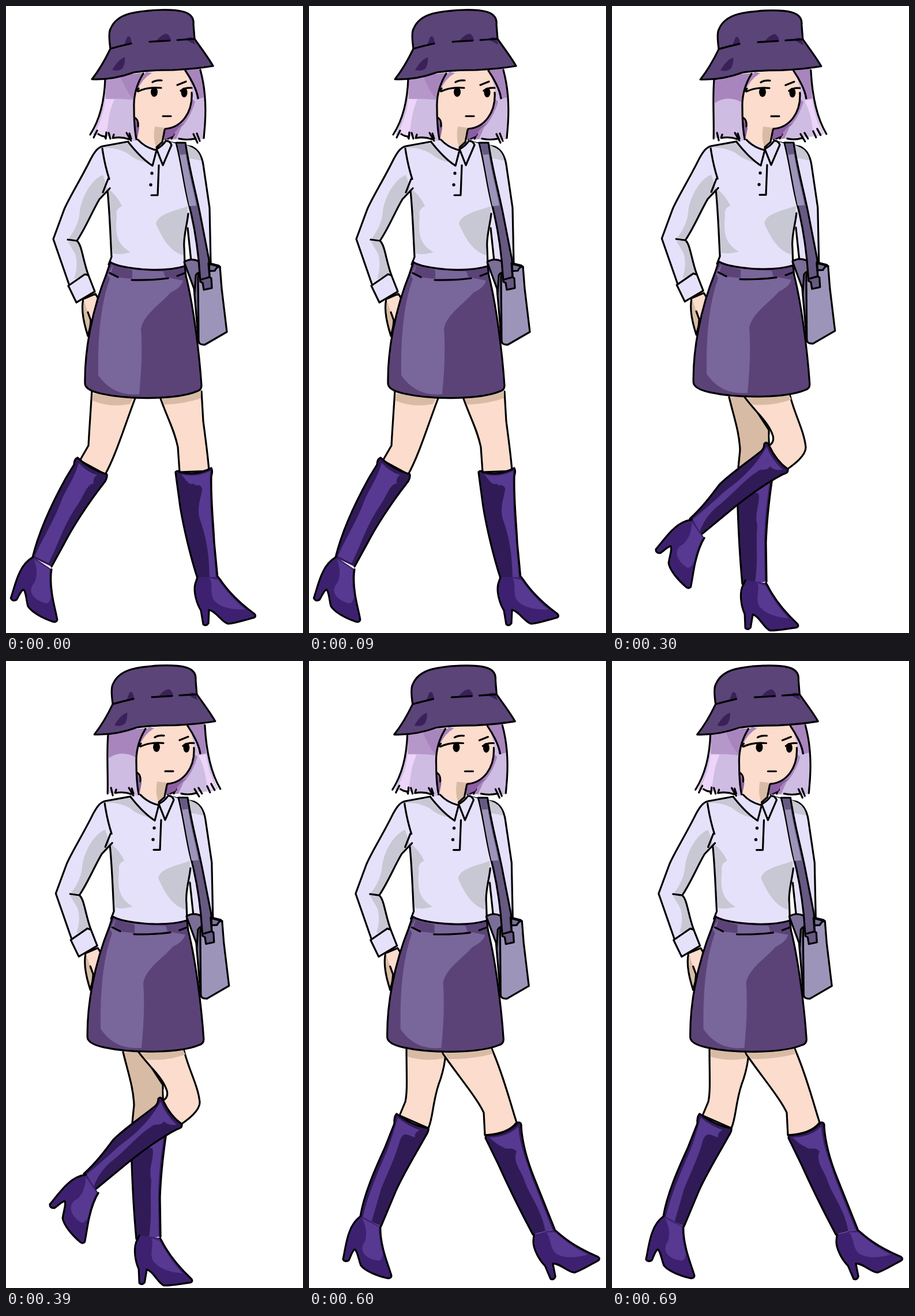
An HTML page for the animation above (0.75 s loop, 515x1087 px).

```html
<!DOCTYPE html>
<html lang="en">
<head>
<meta charset="utf-8">
<title>Walk cycle</title>
<style>
html, body { margin: 0; width: 100%; height: 100%; overflow: hidden; background: #fff; }
svg { display: block; width: 100%; height: 100%; }
path, ellipse, circle { stroke: none; stroke-linecap: round; stroke-linejoin: round; }
.ink { fill: none; stroke: #000; stroke-width: 3.2; }
.line { stroke: #000; stroke-width: 3.2; }
.skin { fill: #fbdccd; }
.tan { fill: #d8bba5; }
.shirt { fill: #e6e1fa; }
.grey { fill: #c8c8d4; }
.hat { fill: #5b4478; }
.spot { fill: #3a2159; }
.hair { fill: #cfbce2; }
.root { fill: #a985bd; }
.deep { fill: #8b5fa2; }
.pale { fill: #ecd5f8; }
.skirt { fill: #5b4378; }
.sheen { fill: #79669a; }
.bag { fill: #9d95b9; }
.side { fill: #7b6f97; }
.strap { fill: #665982; }
.shaft { fill: #301b57; }
.foot { fill: #3d2170; }
.gloss { fill: #573991; }
.pose { visibility: hidden; animation: show .75s step-end infinite; animation-delay: calc((var(--i) - 5) * .15s); }
@keyframes show { 0% { visibility: visible; } 20%, 100% { visibility: hidden; } }
</style>
</head>
<body>
<svg viewBox="0 0 515 1087">
<defs>
  <g id="torso">
    <path class="tan line" d="M134,508C130,525 135,548 139,562L142,572L150,540"/>
    <path class="skin line" d="M134,508L155,499C161,507 163,516 160,523C155,532 155,547 152,559Q148,562 146,556L147,545L142,531"/>
    <path class="shirt line" d="M284,236L322,244C335,250 340,262 342,275L353,350L355,447L321,442L315,385"/>
    <path class="shirt" d="M212,235L168,243C158,245 152,256 147,265C130,300 105,340 100,355L82,404L109,482L143,467C133,440 132,415 123,407C138,385 150,355 162,335L176,320C180,360 181,400 183,435L178,448Q240,468 312,452L309,420C308,400 315,380 316,350L330,250L284,235Z"/>
    <path class="grey" d="M165,246Q180,239 211,238Q228,260 246,272Q225,268 210,255Q190,244 165,246ZM324,246Q337,254 338,268L313,263L311,240Z"/>
    <path class="grey" d="M168,293Q174,310 176,318L161,334C148,358 138,388 123,404L107,405Q127,380 128,355C134,320 155,297 168,293ZM107,408L124,408C132,420 134,443 141,465L118,473Q126,450 120,430Z"/>
    <path class="grey" d="M178,317Q195,332 201,347Q189,352 192,365C189,395 192,413 216,427Q198,432 185,429Q180,375 178,317ZM315,347C295,355 262,360 260,378C267,392 280,425 307,432Q306,406 314,385Z"/>
    <path class="ink" d="M212,235L168,243C158,245 152,256 147,265C130,300 105,340 100,355L82,404L109,482M143,467C133,440 132,415 123,407L107,405M123,407C138,385 150,355 162,335L180,316M167,247Q171,275 179,300M177,300L168,323M176,320C180,360 181,400 183,435L178,448M316,360C314,380 307,400 309,420L310,449"/>
    <path class="shirt line" d="M108,485L137,465L143,467L154,495L122,514Z"/>
    <path class="side line" d="M309,444Q320,436 335,443L371,452L345,587L334,583L326,490Z"/>
    <path class="bag line" d="M333,472Q333,461 342,460L362,459Q366,451 371,452L374,490L383,565L345,587Q334,588 334,580Z"/>
    <path class="ink" d="M327,500L329,467Q333,460 340,462M353,446L369,450"/>
    <path class="strap line" d="M295,237L311,237C318,285 330,325 338,368L352,440L353,470L356,472L357,489L343,492L341,480L337,478L334,440C330,400 323,365 315,335C307,300 304,270 295,237Z"/>
    <path class="bag" d="M297,239L309,239C315,285 325,318 330,346L318,347C309,305 304,270 297,239Z"/>
    <path class="strap" d="M297,239L309,239L312,257L302,258Z"/>
    <path class="ink" d="M351,446L353,470L339,474"/>
  </g>

  <g id="sheen">
    <path class="sheen" d="M185,450Q225,460 273,460L276,470L307,476Q304,488 285,497C268,517 238,535 234,560C237,600 234,640 231,673C200,676 176,664 160,640C159,580 163,520 180,473L176,466Z"/>
    <path class="skirt" d="M190,470L219,473V458L186,450L182,463Z"/>
    <path class="ink" d="M180,463L194,470M218,475Q250,476 281,472M297,468L310,463"/>
  </g>
  <g id="skirt">
    <path class="skirt line" d="M181,444C200,456 270,463 310,451L312,468C325,520 335,600 339,658Q339,666 331,668C300,681 220,684 165,672Q138,666 137,655C136,600 148,530 174,465Z"/>
    <use href="#sheen"/>
  </g>
  <g id="wideSkirt">
    <path class="skirt line" d="M181,444C200,456 270,463 310,451L312,468C325,520 333,575 342,608L355,644Q353,656 332,664C300,681 220,684 165,674Q138,668 137,655C136,600 148,530 174,465Z"/>
    <use href="#sheen"/>
  </g>

  <g id="leftHair">
    <path class="hair" d="M173,122L237,116C223,135 222,165 223,190L230,212L227,237L212,230L172,229Z"/>
    <path class="root" d="M173,122L237,116C225,135 222,150 222,167Q196,153 174,168Z"/>
    <path class="ink" d="M173,125C170,160 173,195 172,230M178,220L181,233M187,223L185,229Q200,226 213,231M209,220L218,236M214,221L217,230"/>
  </g>
  <g id="leftFlick">
    <path class="hair" d="M173,122L237,116C223,135 222,165 223,190L230,212L227,237L212,230L150,223Q170,180 173,122Z"/>
    <path class="pale" d="M172,161L188,162C177,185 178,205 173,227L153,222Q170,190 172,161Z"/>
    <path class="root" d="M173,122L237,116C225,135 222,150 222,163Q196,160 173,161Z" opacity=".65"/>
    <path class="root" d="M198,121L237,116C225,135 222,150 222,163Q208,148 198,121Z"/>
    <path class="ink" d="M172,125C171,160 164,195 146,223M158,216L152,228M160,222Q166,226 171,226L173,230L174,219M178,220L181,230M187,223L185,229Q200,226 213,231M209,220L218,236M214,221L217,230"/>
  </g>
  <g id="rightHair">
    <path class="hair" d="M310,110L338,108C345,140 347,175 345,205L342,231L275,232L270,214Q318,200 322,155Z"/>
    <path class="root" d="M310,110L338,108L344,158L331,162Q326,130 310,110ZM270,214Q320,200 322,160L328,166Q319,195 304,210L295,230L275,232Z"/>
    <path class="ink" d="M337,111C345,140 347,175 345,205L343,229M276,231L284,222M281,230L291,223M291,221L287,230M300,230Q313,233 328,230M325,222L332,237M331,221L336,234"/>
  </g>
  <g id="rightFlick">
    <path class="hair" d="M310,110L341,108C343,150 350,195 364,221L352,226L275,232L270,214Q318,200 322,155Z"/>
    <path class="pale" d="M330,164L343,161Q348,197 362,220L345,227Q344,190 330,164Z"/>
    <path class="root" d="M310,110L341,108L343,160L331,162Q326,130 310,110ZM270,214Q320,200 322,160L328,166Q319,195 304,210L295,230L275,232Z"/>
    <path class="ink" d="M341,111C343,150 349,190 368,222M276,231L284,222M281,230L291,223M291,221L287,230M300,230Q313,233 326,229M323,222L331,235M330,220L336,230M345,217L350,228M352,213L358,224"/>
  </g>
  <g id="head">
    <path class="deep" d="M222,190L232,198L231,224L226,235ZM275,214L310,204Q295,212 290,225L274,232Z"/>
    <path class="skin" d="M237,116L310,109Q319,125 323,150C323,185 303,209 274,213L271,236L261,247L227,232L231,212L223,192C221,165 224,135 237,116Z"/>
    <path class="tan" d="M258,209L275,211L271,236L261,246Q254,230 258,209Z"/>
    <path class="root" d="M225,146L230,126L244,114L253,116Q235,127 228,146Z"/>
    <path class="ink" d="M238,117C225,138 221,158 222,178C222,202 224,225 228,239M226,147L230,143M224,194Q230,198 229,209M311,112C320,125 331,145 333,160M322,150C324,185 304,211 276,213M275,215L271,236L261,245M229,148Q246,140 269,142M303,147Q310,141 322,142M254,132Q260,128 270,129M297,137L312,131M272,191H286"/>
    <ellipse cx="257" cy="149" rx="6" ry="8.5"/>
    <ellipse cx="309" cy="150" rx="5.5" ry="8.5"/>
    <path class="hat line" d="M149,127C160,113 171,95 181,74C179,60 178,46 181,40C187,25 200,17 215,13C240,7 285,4 308,10C322,14 326,22 325,32L327,57C336,70 350,88 359,104C335,108 310,110 290,111C255,111 235,113 222,115C200,123 175,128 149,127Z"/>
    <path class="spot" d="M205,67L210,54Q216,49 218,64ZM261,60Q271,48 279,48Q285,52 286,59ZM311,58Q318,51 325,56L328,67ZM184,111Q195,92 206,89Q207,100 202,108Q195,114 184,111Z"/>
    <path class="ink" d="M181,74Q199,69 217,65M249,62L284,60M297,59L327,57"/>
    <path class="shirt line" d="M212,236Q234,264 254,277L261,250Q242,246 229,232M261,248L272,276L287,241Q284,233 277,234Q271,243 261,248"/>
    <path class="ink" d="M265,276L263,328H252"/>
    <circle cx="253" cy="290" r="2.7"/>
    <circle cx="251" cy="310" r="2.7"/>
  </g>

  <g id="leadFoot">
    <path class="foot line" d="M368,990Q372,995 376,1001C390,1020 405,1035 431,1054Q435,1059 428,1061C415,1064 398,1070 385,1071C374,1068 364,1049 352,1047L351,1070Q347,1076 342,1072L338,1048C330,1035 325,1015 328,1002L332,990"/>
    <path class="gloss" d="M353,992C360,1002 352,1020 362,1032C375,1044 395,1047 415,1046C400,1035 385,1018 368,995Z"/>
  </g>
  <g id="trailFoot">
    <path class="foot line" d="M124,980C123,995 126,1010 130,1025C134,1040 140,1055 143,1066Q142,1071 136,1070C118,1066 98,1058 90,1048C86,1038 84,1022 79,1020C74,1024 72,1034 69,1039Q62,1043 59,1037C62,1025 64,1005 70,990C74,978 82,968 90,962"/>
    <path class="gloss" d="M92,966L121,981Q121,1005 128,1027Q127,1042 118,1039C98,1036 85,1022 97,1006Q103,988 92,966Z"/>
  </g>
  <g id="standBoot">
    <path class="shaft line" d="M280,1002C275,950 273,900 272,870L269,809Q272,804 277,812Q305,820 331,811Q334,815 331,825C326,860 322,900 321,930L322,998"/>
    <path class="gloss" d="M278,815Q305,824 329,816C323,855 318,890 318,940L319,998L302,999C308,960 303,930 306,900C300,880 312,860 308,845C300,845 300,835 292,835Q285,828 278,815Z"/>
    <use href="#leadFoot" transform="translate(-57 7) rotate(7 347 1073)"/>
  </g>
  <g id="bentBoot">
    <path class="shaft line" d="M89,889C110,870 125,850 140,830C160,810 190,790 211,773Q218,768 218,759Q222,754 226,761Q238,788 259,803Q260,810 250,812C225,825 190,850 165,870L108,917"/>
    <path class="gloss" d="M222,764Q232,788 250,804Q235,806 228,798C222,808 212,800 205,808C185,820 165,845 140,865C120,880 110,900 106,912L94,890C118,870 135,855 150,841C180,820 205,795 222,764Z"/>
    <use href="#trailFoot" transform="translate(-31 -93) rotate(28 64 1040)"/>
  </g>
</defs>

<g class="pose" style="--i:0">
  <path class="skin line" d="M149,665C147,700 144,740 143,762L128,788L172,812C190,780 205,730 224,680"/>
  <path class="skin line" d="M267,678C280,715 292,735 298,765L301,808L352,806C351,790 346,750 342,720L339,668"/>
  <path class="tan" d="M151,672L150,684Q180,697 215,690L220,680ZM270,680L274,691Q310,690 338,680V668Z"/>
  <path class="shaft line" d="M46,956C56,915 78,865 104,818L118,795Q118,786 124,783Q145,803 175,812Q176,820 169,828C140,865 115,905 102,930L79,972"/>
  <path class="gloss" d="M126,792Q140,808 158,813Q150,818 152,828C140,828 135,850 122,868C100,900 92,930 74,966L50,954C62,925 85,890 97,855C106,835 118,820 126,792Z"/>
  <use href="#trailFoot" transform="translate(-51 -10) rotate(6 64 1040)"/>
  <path class="shaft line" d="M332,992C320,955 308,905 302,868C299,845 296,825 294,808Q297,804 301,808Q330,815 356,801Q359,806 356,815C355,860 360,900 361,930L367,992"/>
  <path class="gloss" d="M304,812Q330,818 354,806C353,850 355,890 359,930L364,992H353C352,950 348,925 338,895C328,870 340,850 340,836C335,826 330,835 325,828C318,832 312,822 304,812Z"/>
  <use href="#leadFoot"/>
  <use href="#torso"/><use href="#skirt"/>
  <use href="#leftFlick"/><use href="#rightHair"/><use href="#head"/>
</g>

<g class="pose" style="--i:1">
  <path class="skin line" d="M280,670L291,768L277,812Q305,820 328,813C329,780 331,720 334,665"/>
  <path class="tan" d="M291,772L278,812L295,816Q294,790 291,772ZM282,680L284,692Q310,692 331,681V668Z"/>
  <use href="#standBoot"/>
  <path class="skin line" d="M208,678C218,712 236,735 238,752Q228,754 225,762Q238,788 259,803C278,793 290,782 291,766C289,735 283,700 280,675"/>
  <path class="tan" d="M211,680L216,690Q245,695 280,690L279,678Z"/>
  <use href="#bentBoot"/>
  <g transform="translate(.5 1.2) scale(.996 .995)">
    <use href="#torso"/><use href="#skirt"/>
    <use href="#leftHair"/><use href="#rightHair"/><use href="#head"/>
  </g>
</g>

<g class="pose" style="--i:2">
  <path class="tan line" d="M203,678C212,715 221,740 222,770L219,800L273,825L272,735L235,678"/>
  <use href="#standBoot" x="-54"/>
  <path d="M273,742L279,749L274,757Z" fill="#fff"/>
  <path class="skin line" d="M230,678C250,705 272,722 279,745Q282,757 272,762Q284,788 304,803C315,795 336,780 336,765C333,735 315,705 308,672"/>
  <path class="tan" d="M234,680L244,691Q280,694 311,682L307,674Z"/>
  <use href="#bentBoot" x="46"/>
  <g transform="translate(4.5 1) scale(.998 .995)">
    <use href="#torso"/><use href="#skirt"/>
    <use href="#leftHair"/><use href="#rightFlick"/><use href="#head"/>
  </g>
</g>

<g class="pose" style="--i:3">
  <path class="skin line" d="M150,662C153,700 158,740 163,767L154,790Q180,806 205,806C213,780 218,720 221,678"/>
  <path class="skin line" d="M281,675C300,705 318,730 326,755L327,784L378,785C377,750 362,690 350,650"/>
  <path class="tan" d="M153,670L155,684Q185,693 218,688L219,678ZM285,677L292,687Q330,682 353,668L349,656Z"/>
  <path class="shaft line" d="M107,975C112,930 122,880 131,850L146,797Q145,789 149,787Q180,806 205,805Q208,808 204,816C190,850 175,885 165,915L148,984"/>
  <path class="gloss" d="M152,793Q175,808 192,811Q184,818 184,825C172,822 168,815 158,825C150,860 145,890 140,920L134,978L112,974C118,930 125,890 134,862C142,838 142,815 152,793Z"/>
  <use href="#trailFoot" transform="translate(31 11) rotate(-7 64 1040)"/>
  <path class="shaft line" d="M341,970C334,930 326,890 324,865L318,785Q320,779 325,782Q352,789 379,783Q384,785 381,793C377,830 375,860 376,890L376,965"/>
  <path class="gloss" d="M326,786Q352,794 378,788C373,830 371,860 373,900L374,968L362,970C366,935 357,915 361,880C352,862 362,840 358,822C350,812 345,820 340,808Q332,803 326,786Z"/>
  <use href="#leadFoot" transform="translate(2 -23) rotate(5 347 1073)"/>
  <g transform="translate(-.8 -.8) scale(.998)">
    <use href="#torso"/><use href="#wideSkirt"/>
    <use href="#leftHair"/><use href="#rightHair"/><use href="#head"/>
  </g>
</g>

<g class="pose" style="--i:4">
  <path class="skin line" d="M169,670C169,720 171,745 167,764L157,788L207,810C216,790 214,760 228,725Q236,700 237,678"/>
  <path class="skin line" d="M229,676C255,715 290,755 303,783L305,822Q345,820 360,800C350,770 338,720 316,670"/>
  <path class="tan" d="M171,672V686Q200,695 234,689L229,676ZM234,679L242,690Q280,691 319,681L315,670Z"/>
  <path class="shaft line" d="M89,963C95,925 115,880 131,845L148,802Q147,790 152,785Q180,806 207,810Q208,815 202,824C185,855 160,895 148,925L125,980"/>
  <path class="gloss" d="M154,792Q175,808 192,813Q182,818 184,826C170,822 165,815 158,830C150,860 135,890 125,915L108,974L93,965C102,925 120,885 135,850C145,825 148,810 154,792Z"/>
  <use href="#trailFoot"/>
  <path class="shaft line" d="M388,994C370,960 345,910 328,872L306,827Q306,820 311,822Q345,820 362,800Q369,799 368,808C370,835 378,865 390,895L426,985"/>
  <path class="gloss" d="M313,826Q345,825 363,807C365,840 378,870 388,900L422,985L410,990C405,955 385,930 375,905C370,885 352,870 360,850C350,840 345,850 335,842Q325,838 313,826Z"/>
  <use href="#leadFoot" transform="translate(77 -2) rotate(-13.5 347 1073)"/>
  <g transform="translate(-1 1.2) scale(.998 .995)">
    <use href="#torso"/><use href="#skirt"/>
    <use href="#leftFlick"/><use href="#rightHair"/><use href="#head"/>
  </g>
</g>
</svg>
</body>
</html>
```
